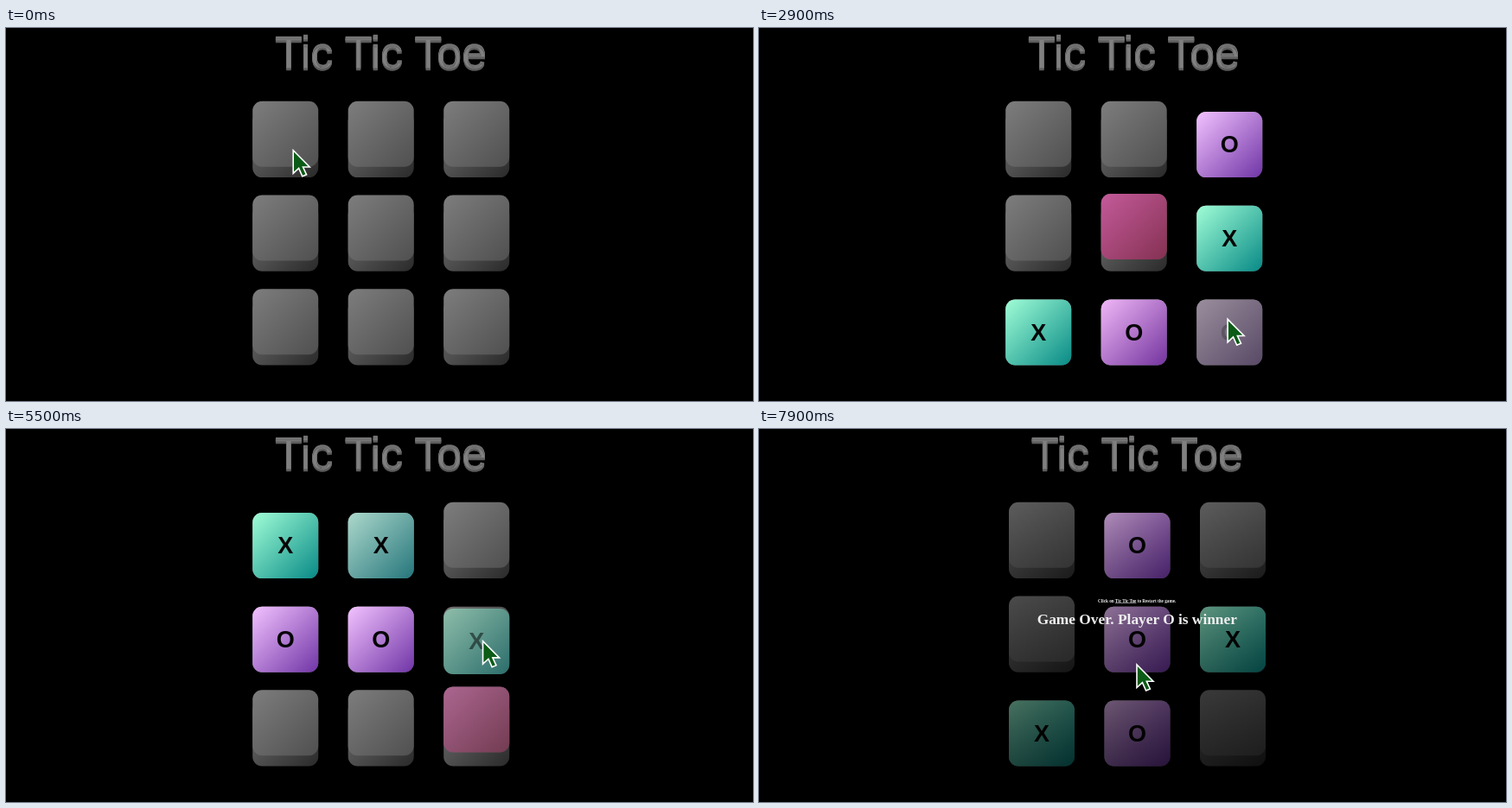
Recreate the animation shown at these times as an HTML page. Size 864 by 432 pixels, loop 8000 ms.

```html
<!DOCTYPE html>
<html lang="en">
<head>
<meta charset="utf-8">
<title>Tic Tic Toe</title>
<style>
  html, body { margin: 0; width: 100%; height: 100%; overflow: hidden; background: #000; }
  svg { display: block; width: 864px; height: 432px; }
  text { text-anchor: middle; }
  .title { font: 51.9px "Liberation Sans", Arial, sans-serif; fill: #808080;
           stroke: #808080; stroke-width: 0.5px;
           text-shadow: 0 1px #606060, 0 2px #606060, 0 3px #585858; }
  .mark { font: bold 27px "Liberation Sans", Arial, sans-serif; fill: #050505; }
  .end { font: bold 17.35px "Liberation Serif", Times, serif; fill: #eee; }
  .hint { font-size: 5.2px; }
  .hint tspan { text-decoration: underline; }
</style>
</head>
<body>
<svg viewBox="0 0 864 432">
  <defs id="defs">
    <linearGradient id="shade" x2="0" y2="1">
      <stop stop-color="#000" stop-opacity="0.23"/>
      <stop offset="1" stop-color="#000" stop-opacity="0.7"/>
    </linearGradient>
  </defs>
  <g id="page">
    <text class="title" x="433.5" y="46">Tic Tic Toe</text>
    <g id="board"></g>
  </g>
  <g id="over" visibility="hidden">
    <rect y="60" width="864" height="372" fill="url(#shade)"/>
    <text class="end hint" x="437.2" y="200.5">Click on <tspan>Tic Tic Toe</tspan> to Restart the game.</text>
    <text class="end" x="437.3" y="226">Game Over. Player O is winner</text>
  </g>
  <path id="cursor" d="M0 0V26.5L6.4 20.6L10.6 30L15.4 28L11.3 19.2H19Z"
        fill="#0b5c16" stroke="#fff" stroke-width="1.6"/>
</svg>
<script>
const LOOP = 8000, OVER_AT = 7300, DROP = 12.3, SIZE = 76;
const $ = id => document.getElementById(id);

const skins = {
  base: ['#747474', '#2a2a2a'],
  gray: ['#7d7d7d', '#505050'],
  X: ['#a0fdd6', '#088a86'],
  O: ['#f2c2ff', '#7035a6'],
  warn: ['#db4fa4', '#962753']
};

const clamp = v => Math.min(1, Math.max(0, v));
const smooth = p => 0.5 - 0.5 * Math.cos(Math.PI * clamp(p));
const ramp = (t, start, span) => smooth((t - start) / span);

// Values at t between keys of the form [t, ...values].
function between(keys, t, ease = clamp) {
  const next = Math.max(1, keys.findIndex(key => key[0] > t));
  const [a, b] = t >= keys.at(-1)[0] ? keys.slice(-2) : keys.slice(next - 1, next + 1);
  const k = ease((t - a[0]) / (b[0] - a[0]));
  return a.slice(1).map((v, i) => v + (b[i + 1] - v) * k);
}

// Cells in order of play: O and X take turns, O first.
const tempo = [[0, 260], [4, 1835], [7, 3285], [11, 5350], [13, 6685], [14, 7150]];
const moves = [...'047526813045761'].map((cell, i) => ({ cell: +cell, on: between(tempo, i)[0] }));

const cellAt = i => [285.2 + (i % 3) * 110.5, 97.1 + Math.floor(i / 3) * 108.7];

// The pointer visits every played cell, with a few bends on the way.
const bends = [
  [2100, 486, 159.5], [3600, 367, 166], [4700, 457, 212.5], [5520, 551.5, 245.5],
  [7000, 361, 343], [7550, 437, 140], [7900, 437, 273]
];
const stops = moves.map(({ cell, on }) => {
  const [x, y] = cellAt(cell);
  return [on, x + 47, y + 44.7];
}).concat(bends).sort((a, b) => a[0] - b[0]);

function el(tag, attrs, parent) {
  const node = document.createElementNS('http://www.w3.org/2000/svg', tag);
  for (const key in attrs) node.setAttribute(key, attrs[key]);
  return parent.appendChild(node);
}

for (const [id, [from, to]] of Object.entries(skins)) {
  const grad = el('linearGradient', { id, x2: 1, y2: 1 }, $('defs'));
  el('stop', { 'stop-color': from }, grad);
  el('stop', { offset: 1, 'stop-color': to }, grad);
}

const tile = (id, parent) =>
  el('rect', { width: SIZE, height: SIZE, rx: 11, fill: `url(#${id})` }, parent);

const cells = Array.from({ length: 9 }, (_, i) => {
  const group = el('g', { transform: `translate(${cellAt(i)})` }, $('board'));
  tile('base', group);
  const cap = el('g', {}, group);
  tile('gray', cap);
  const layers = { X: tile('X', cap), O: tile('O', cap), warn: tile('warn', cap) };
  const mark = el('text', { class: 'mark', x: SIZE / 2, y: 47.3 }, cap);
  return { cap, layers, mark, pieces: [] };
});

// Each move clears the rival's marked piece, then marks the mover's oldest of three.
function playOut() {
  const live = { O: [], X: [] };
  moves.forEach(({ cell, on }, i) => {
    const kind = 'OX'[i % 2], rival = 'XO'[i % 2];
    const piece = { kind, on, warn: Infinity, off: Infinity };
    cells[cell].pieces.push(piece);
    live[kind].push(piece);
    if (live[rival].length === 3) live[rival].shift().off = on;
    if (live[kind].length === 3 && i < moves.length - 1) live[kind][0].warn = on;
  });
}

// Runs from 0 to 1, going past the end by extra halfway.
function spring(t, start, extra) {
  const p = clamp((t - start) / 300);
  return p < 0.5 ? (1 + extra) * Math.sin(Math.PI * p) : 1 + extra * smooth(2 - 2 * p);
}

function drawCell({ cap, layers, mark, pieces }, t) {
  const piece = pieces.filter(p => p.on <= t).pop();
  const show = { X: 0, O: 0, warn: 0 };
  let down = 0, ink = 0;
  if (piece) {
    const gone = t >= piece.off;
    down = gone ? 1 - spring(t, piece.off, 0.3) : spring(t, piece.on, 0.17);
    ink = gone ? 0 : ramp(t, piece.on, 300);
    show[piece.kind] = ink;
    show.warn = gone ? 1 - ramp(t, piece.off, 300) : ramp(t, piece.warn, 500);
    mark.textContent = piece.kind;
  }
  cap.setAttribute('transform', `translate(0 ${(down - 1) * DROP})`);
  mark.setAttribute('opacity', ink);
  for (const key in show) layers[key].setAttribute('opacity', show[key]);
}

function draw(now) {
  const t = now % LOOP, over = t >= OVER_AT;
  cells.forEach(cell => drawCell(cell, t));
  $('cursor').setAttribute('transform', `translate(${between(stops, t, smooth)})`);
  $('page').setAttribute('transform', `translate(${over ? 3.8 : 0} 0)`);
  $('over').setAttribute('visibility', over ? 'visible' : 'hidden');
}

playOut();
const start = performance.now();
function tick() {
  draw(performance.now() - start);
  requestAnimationFrame(tick);
}
tick();
</script>
</body>
</html>
```
